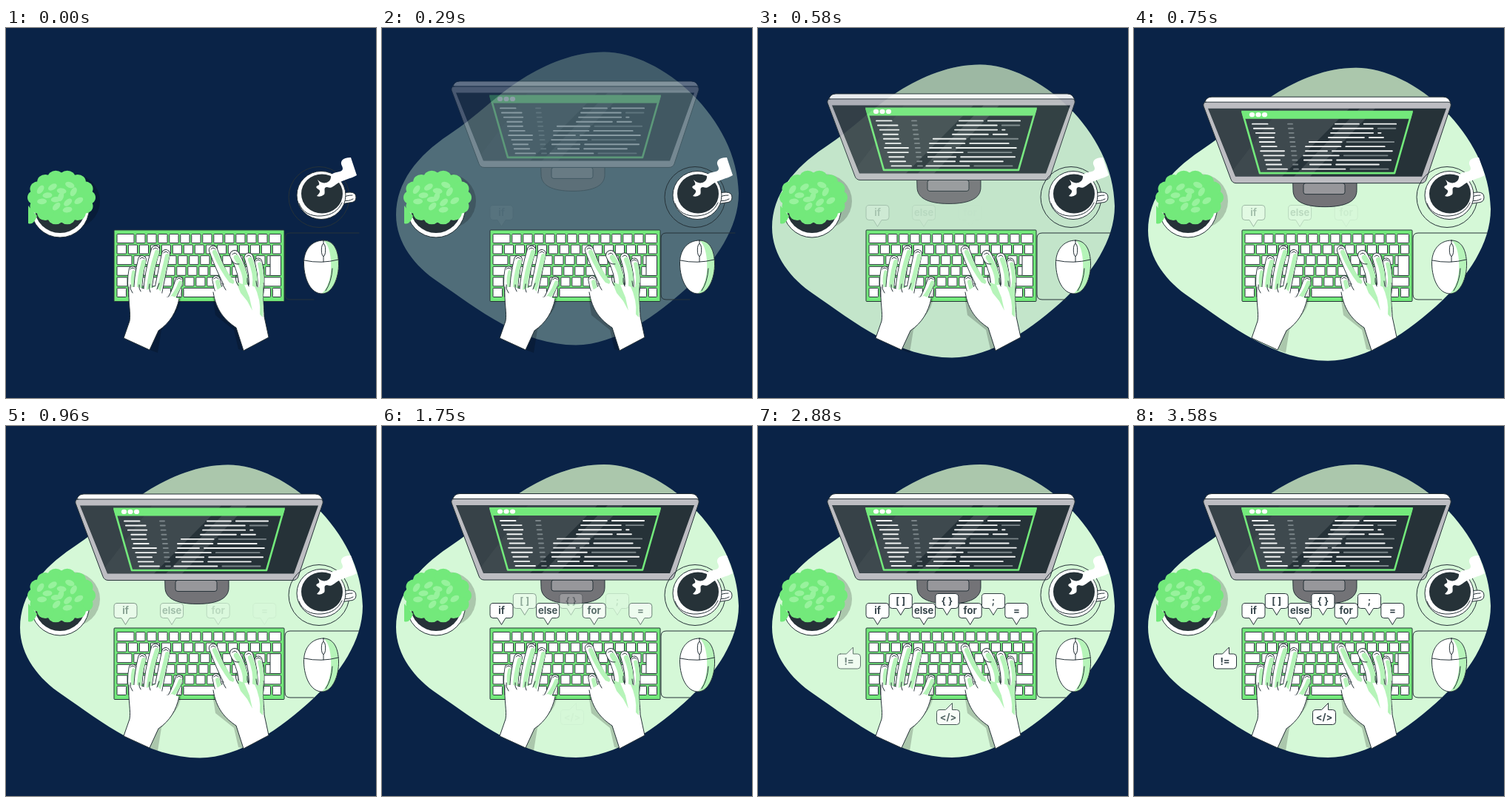
Recreate the animation shown at these times as an HTML page. Size 500 by 500 pixels, loop 3750 ms.

```html
<!DOCTYPE html>
<html lang="en">
<head>
<meta charset="utf-8">
<title>Coding desk</title>
<style>
html, body { margin: 0; width: 100%; height: 100%; overflow: hidden; background: #0a2347; }
svg { display: block; width: 100vw; height: 100vh; }
text { font: 700 13px Inter, "Open Sans", sans-serif; text-anchor: middle; fill: #37464c; }
</style>
</head>
<body>
<svg id="stage" viewBox="0 0 500 500"></svg>
<script>
const LOOP = 3750, STEP = 1000 / 24;
const NAVY = '#0a2347', INK = '#263238', GREEN = '#73e97b', PALE = '#b6f4b9';

const path = (d, fill = 'none', stroke = 'none', w = 1, more = '') =>
  `<path d="${d}" fill="${fill}" stroke="${stroke}" stroke-width="${w}" stroke-linecap="round" stroke-linejoin="round" ${more}/>`;
const line = (d, w = 1, color = INK) => path(d, 'none', color, w);
const oval = (x, y, rx, ry, fill, more = '') =>
  `<ellipse cx="${x}" cy="${y}" rx="${rx}" ry="${ry}" fill="${fill}" ${more}/>`;
const box = (x, y, w, h, fill, r = 0, more = '') =>
  `<rect x="${x}" y="${y}" width="${w}" height="${h}" rx="${r}" fill="${fill}" ${more}/>`;
const repeat = (n, make) => Array.from({ length: n }, (_, i) => make(i)).join('');
const inked = `stroke="${INK}" stroke-width="1"`;
const shade = 'opacity=".2"';

function seeded(seed) {
  return () => (seed = (seed * 16807) % 2147483647) / 2147483647;
}

const BLOB = 'M300 52C378 52 481 142 482 243C482 290 450 335 416 367C372 408 315 448 262 448' +
  'C190 448 130 400 75 362C45 342 19 310 19 272C19 228 48 192 90 164C132 136 152 112 190 88C222 68 260 52 300 52Z';

function blob() {
  return `<clipPath id="cut"><path d="${BLOB}"/></clipPath>` + path(BLOB, '#d5f8d7') +
    box(140, 40, 300, 64, '#000', 0, 'clip-path="url(#cut)" ' + shade);
}

function codeLines() {
  const rnd = seeded(77);
  return repeat(11, i => {
    const y = 128 + i * 6.1, end = 362 - i * 1.8;
    const dash = (a, b, color = '#f2f4f4') => line(`M${a} ${y}H${b}`, 1.9, color);
    const left = 160 + i * 1.8 + rnd() * 4;
    const start = i < 4 ? 272 - i * 3 : 225 + rnd() * 20;
    const mid = start + 28 + rnd() * 30;
    return dash(left, left + 18 + rnd() * 14) +
      dash(208 + i * .8, 214 + i * .8, '#7b8589') +
      dash(start, mid) +
      dash(mid + 7, end - rnd() * 25, i % 3 == 1 ? '#7b8589' : '#f2f4f4');
  });
}

function monitor() {
  return path('M215 205H301V218C301 232 287 240 258 240C229 240 215 232 215 218Z', '#737377', INK) +
    box(229, 208, 56, 15, '#97979b', 3, inked) +
    path('M95 102Q96 91.500 105 91.500H418Q427 91.500 428 102Z', '#fff', INK) +
    path('M97 98.500H425Q429 99 428 104L395 203Q393 208 388 208H138Q133 208 131 203L94 104Q93 99 97 98.500Z', '#bdbdc2', INK) +
    path('M100 107H422L389 199H137Z', INK) +
    path('M100 107H197L134 190Z', '#fff', 'none', 0, 'opacity=".08"') +
    path('M197 107H291L200 199H137L134 190ZM305 107H326L238 199H216Z', '#fff', 'none', 0, 'opacity=".11"') +
    line('M146.500 112H375.500L352 194.500H170Z', 2.6, GREEN) +
    path('M145 110H377L374 121H148Z', GREEN) +
    repeat(3, i => oval(159.5 + i * 8.5, 115.5, 3.6, 3.1, '#fff')) +
    codeLines();
}

function plant() {
  const leaves = 14, rnd = seeded(5);
  return oval(89, 234, 38, 37, '#000', shade) +
    oval(73, 243, 39.5, 40, '#fff', inked) + oval(73, 244, 34, 33, INK) +
    oval(74, 229, 40, 33, GREEN) +
    repeat(leaves, i => {
      const a = i / leaves * Math.PI * 2;
      return oval(75 + 35 * Math.cos(a), 229 + 27 * Math.sin(a), 11, 10, GREEN);
    }) +
    path('M30 240L30 264Q37 267 42 254Z', GREEN) +
    repeat(13, i => {
      const a = i * 2.4, r = Math.sqrt(i / 13);
      const x = 74 + 33 * r * Math.cos(a), y = 228 + 20 * r * Math.sin(a);
      return oval(x, y, 6.5, 3.8, '#98f29d', `transform="rotate(${rnd() * 100 - 70} ${x} ${y})"`);
    });
}

function coffee() {
  return oval(423, 228.5, 41, 41, 'none', inked) +
    path('M454 225Q456 222 465 222Q473 222 473 229Q473 236 464 236L453 238Z', '#fff', INK) +
    line('M457 229Q459 226 468 226M456 233Q462 235 469 231') +
    oval(426, 226, 33, 32.5, '#fff', inked) +
    line('M396 237C400 249 412 255 426 254C440 253 449 247 454 236') +
    oval(427, 224, 28, 26.5, INK) +
    path('M421 205C425 209 430 211 435 208C442 204 436 199 443 196C450 194 455 194 455 190' +
      'C455 186 451 184 454 179Q457 175 466 175L474 199C465 204 456 205 448 210C441 215 439 217 434 215' +
      'C428 215 432 221 430 225Q425 229 420 227C424 223 426 220 422 218Q417 215 421 213C425 212 423 209 421 205Z', '#fff');
}

function mouse() {
  const right = 'M429 287C443 287 449 300 449.500 318C450 338 441 359 427 359';
  return line('M477 277H384Q377 277 377 284V360Q377 367 384 367H416') +
    path(right + 'C412 359 403 340 402.500 319C402 301 412 287 429 287Z', '#fff') +
    path(right + 'C438 347 440 330 439 314C438 301 435 292 429 287Z', PALE) +
    line(right + 'C412 359 403 340 402.500 319C402 301 412 287 429 287Z' +
      'M403 314Q426 319 449 313M429 287V316M441 325Q440 343 432 355') +
    oval(429, 300, 2.7, 8.5, '#fff', inked);
}

function keyboard() {
  const end = 371.5, pitch = 15;
  const key = (x, y, w, h = 12) => box(x, y, w, h, '#fff', .8, inked);
  const row = (first, r) => {
    const y = 278.5 + r * 14.6;
    let s = key(150, y, first), x = 150 + first + 2.8;
    for (; x + 2 * pitch < end + 4; x += pitch) s += key(x, y, 12.2);
    return s + key(x, y, end - x);
  };
  return box(146, 273, 230, 96.5, GREEN, 1, inked) +
    [23, 12.5, 20, 18, 14, 12.5].map(row).join('') +
    key(240, 351.5, 57) + key(357, 307.7, end - 357, 26.8);
}

// a round-ended stroke from tip to knuckle with a green side
function finger(x, y, x2, y2, w, bend = 0) {
  const d = (dx, dy) => `M${x + dx} ${y + dy}Q${(x + x2) / 2 + bend + dx} ${(y + y2) / 2} ${x2 + dx} ${y2 - dy * 3}`;
  return line(d(0, 0), w + 1.8) + line(d(0, 0), w, '#fff') + line(d(w * .2, 3), w * .6, PALE) +
    line(`M${x - 3} ${y - 1}q3 -4 6 0`);
}

function hands() {
  const palm = (edge, top) => path(edge + top + 'Z', '#fff') + line(edge);
  return path('M237 350Q239 371 229 385L210 408L205 439L194 435L205 407L230 380Z' +
      'M279 362L283 388L308 408L314 434L321 436L312 404Z', '#000', 'none', 0, shade) +
    finger(171, 327, 172, 362, 9, -4) +
    finger(184, 313, 178, 362, 10, -3) +
    finger(202, 300, 191, 362, 10.5, -4) +
    finger(216, 305, 204, 364, 10) +
    finger(234, 341, 214, 382, 9, 4) +
    palm('M166 350C165 372 169 385 167 396L159 419L194 435L206 409C222 398 230 384 234 366',
      'L224 362Q215 367 209 356L202 349L190 354L178 350') +
    line('M180 347Q179 352 182 356M194 346Q192 351 195 357M207 345L204 353M168 347Q167 353 171 358') +
    finger(280, 300, 303, 352, 10.5, -2) +
    finger(341, 316, 343, 358, 9, 4) +
    finger(328, 310, 334, 356, 11, 5) +
    finger(309, 307, 321, 356, 12, 8) +
    finger(284, 340, 302, 382, 9.5, -6) +
    palm('M348 345C346 365 349 378 349 390L355 418L321 436L311 405C296 395 284 382 280 357',
      'L290 351L299 343L313 348L327 347L340 351') +
    path('M348 345C346 365 349 378 347 391L343 387Q345 368 335 347L340 351Z' +
      'M311 343L317 358L326 369L333 382L329 364L322 347Z', PALE) +
    line('M311 334Q309 342 314 348M326 338Q325 344 328 349M338 342L339 349M292 345L297 354M305 314Q308 320 315 319');
}

// the tail leaves the bottom edge, or the top edge leaning right
function bubble(label, x, y, up) {
  const top = up ? `h8L${x + 21} ${y - 9}V${y}H${x + 27}` : `H${x + 27}`;
  const low = up ? `H${x + 4}` : `H${x + 21}L${x + 15.5} ${y + 29}L${x + 10} ${y + 20}H${x + 4}`;
  const safe = label.replace('<', '&lt;').replace('>', '&gt;');
  return '<g class="bubble">' +
    path(`M${x + 4} ${y}${top}q4 0 4 4v12q0 4 -4 4${low}q-4 0 -4 -4v-12q0 -4 4 -4Z`, '#fff', INK) +
    `<text x="${x + 15.5}" y="${y + 14.5}">${safe}</text></g>`;
}

function bubbleRow() {
  const labels = ['if', '[ ]', 'else', '{ }', 'for', ';', '='];
  const place = i => bubble(labels[i], 146 + i * 31.3, i % 2 ? 226.5 : 239.5);
  return repeat(4, i => place(i * 2)) + repeat(3, i => place(i * 2 + 1));
}

const stage = document.getElementById('stage');
stage.innerHTML = box(0, 0, 500, 500, NAVY) +
  `<g class="drop">${blob()}</g><g class="drop">${monitor()}</g>` +
  plant() + coffee() + mouse() + keyboard() + hands() +
  bubbleRow() + bubble('</>', 241.5, 383.5, true) + bubble('!=', 107.5, 308, true);

const drops = stage.querySelectorAll('.drop');
const bubbles = stage.querySelectorAll('.bubble');

const clamp = v => Math.min(1, Math.max(0, v));
const smooth = v => v * v * (3 - 2 * v);

// cubic-bezier(.36, -.01, .5, 1.38)
function spring(x) {
  const curve = (a, b, t) => 3 * (1 - t) * (1 - t) * t * a + 3 * (1 - t) * t * t * b + t * t * t;
  let lo = 0, hi = 1;
  for (let i = 0; i < 24; i++) {
    const mid = (lo + hi) / 2;
    if (curve(.36, .5, mid) < x) lo = mid; else hi = mid;
  }
  return curve(-.01, 1.38, lo);
}

function draw(ms) {
  const t = Math.floor((ms % LOOP + 5) / STEP) * STEP;
  const p = t ? spring(clamp((t + 20) / 1000)) : 0;
  for (const g of drops) {
    g.setAttribute('transform', `translate(0 ${30 * (p - 1)})`);
    g.setAttribute('opacity', clamp(p));
  }
  bubbles.forEach((g, i) => g.setAttribute('opacity', smooth(clamp((t - 80 - i * 213) / 1800))));
}

const begin = performance.now();
function tick() {
  draw(performance.now() - begin);
  requestAnimationFrame(tick);
}
draw(0);
requestAnimationFrame(tick);
</script>
</body>
</html>
```
